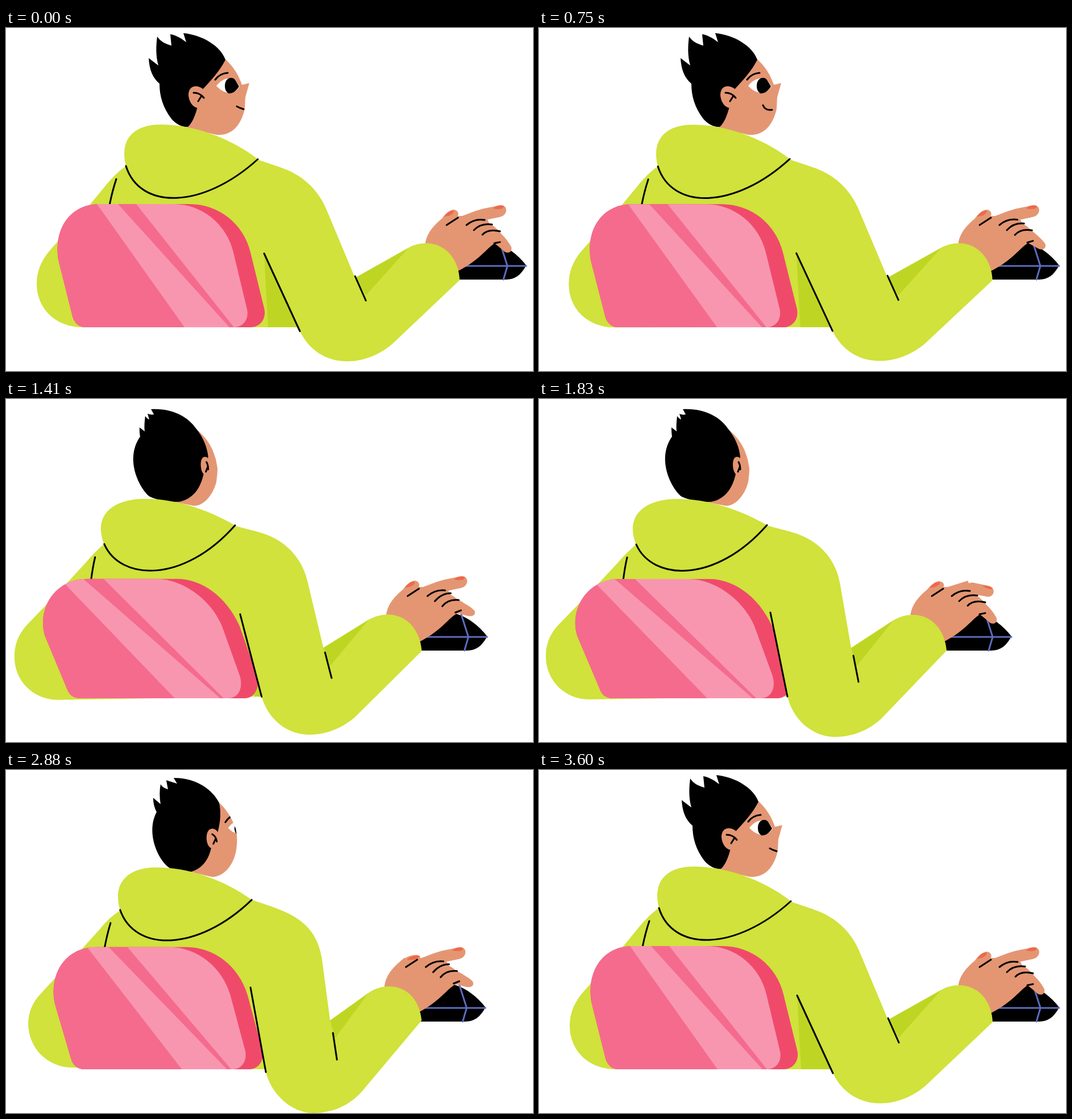
Recreate the animation shown at these times as an HTML page with a canvas. Size 927 px wide and 604 px high, loop 3.63 s.

```html
<!DOCTYPE html>
<html lang="en">
<head>
<meta charset="utf-8">
<style>
html, body { margin: 0; width: 100%; height: 100%; overflow: hidden; background: #fff; }
canvas { display: block; }
</style>
</head>
<body>
<canvas id="stage" width="927" height="604"></canvas>
<script>
const ctx = document.getElementById('stage').getContext('2d');
const LOOP = 3630;
const LIME = '#d0e23b', SHADE = '#bed623', SKIN = '#e49673', NAIL = '#ec6a4b', BLACK = '#000',
  PINK = '#f56b8d', LIGHT = '#f896b0', RED = '#f04a6b', BLUE = '#5c6cc0';

// Poses of one shape share the same path commands: sitting right, sitting left, reaching back.
const torso = [
  'M211 243C199 251 186 264 174 279L146 313L76 393C61 411 54 430 54 450C54 495 88 527 135 527L516 527L454 397L484 246L443 232L330 200Z',
  'M171 256C160 265 149 276 138 289L97 333L32 400C18 416 12 433 12 453C12 496 46 529 88 529L437 524L407 376L443 234L401 223L290 200Z',
  'M201 247C189 255 176 266 166 279L130 319L60 395C46 410 39 428 39 446C39 490 73 523 115 524L457 527L430 383L474 243L433 229L320 200Z'];
const sideShade = [
  'M454 397L461 527L516 527Z', 'M407 376L437 524L437 524Z', 'M430 383L457 527L457 527Z'];
const arm = [
  'M454 397L517 534C533 567 563 587 600 587C630 587 660 574 681 555L798 444C797 410 775 379 739 379C728 379 716 382 706 388L614 440L563 318C548 283 520 258 484 246L443 232Z',
  'M407 376L437 524C447 565 481 595 521 595C552 595 580 583 602 563L717 443C714 408 692 380 657 380C645 380 633 384 623 390L549 438L530 328C523 283 494 248 443 234L401 223Z',
  'M430 383L457 532C467 572 503 604 540 604C575 604 605 590 626 566L731 441C728 408 708 381 673 381C659 381 646 386 637 393L570 441L556 335C549 288 526 262 474 243L433 229Z'];
const armSeam = ['M454 397L517 534', 'M407 376L437 524', 'M430 383L457 532'];
const elbowShade = [
  'M614 440L707 388L633 471Z', 'M549 439L623 390L559 470Z', 'M570 441L637 393L579 472Z'];
const elbowCrease = ['M614 437L633 480', 'M553 452L562 498', 'M575 463L582 510'];
const hood = [
  'M443 231C390 190 325 170 272 170C228 170 208 192 208 221C208 229 209 236 211 243C235 320 345 320 443 231Z',
  'M401 222C350 193 295 176 244 176C190 176 165 200 165 228C165 238 167 248 171 256C199 320 310 326 401 222Z'];
const hoodLine = ['M211 243C235 320 345 320 443 231', 'M171 256C199 320 310 326 401 222'];
const backLine = ['M194 266Q187 287 182 312', 'M155 279Q151 296 148 320'];

const chairLeft = [
  'L140 527C128 527 120 519 117 508L93 412C82 358 110 310 165 310Z',
  'L130 527C117 527 110 520 107 511L68 419C52 370 85 317 142 317Z'];
const chairEdge = [
  'L295 310C345 310 388 345 400 395L424 495C428 513 417 527 401 527',
  'L265 317C305 317 358 350 379 400L410 485C418 508 409 527 390 527'];
const chairBack = [
  'M165 310L322 310C375 310 418 345 430 395L454 493C459 512 447 527 430 527' + chairLeft[0],
  'M142 317L300 317C340 317 385 345 410 400L440 485C447 508 437 527 420 527' + chairLeft[1]];
const chairFront = ['M165 310' + chairEdge[0] + chairLeft[0], 'M142 317' + chairEdge[1] + chairLeft[1]];
const shineWide = ['M229 310' + chairEdge[0] + 'L401 527Z', 'M169 317' + chairEdge[1] + 'L382 527Z'];
const shineThin = ['M160 310L197 310L393 527L314 527Z', 'M92 317L133 317L376 527L296 527Z'];

// Head poses: profile, three-quarter back, back.
const face = [
  'M386 55C400 68 409 82 415 100L428 97L421 122C420 135 421 142 418 150C410 175 395 190 370 188L318 176L330 100Z',
  'M382 54C396 66 404 78 410 91L415 103L417 115C418 125 417 137 415 146C409 172 390 190 372 188L330 178L340 100Z',
  'M376 53C391 66 401 80 406 94L410 106L413 122C413 131 412 138 411 146C405 170 388 189 371 188L330 180L350 100Z'];
const hair = [
  'M320 174C311 175 301 171 291 160C276 140 270 120 270 98C258 88 252 73 251 53L268 66C263 48 264 30 266 15C271 23 280 28 291 31L289 11C297 12 307 17 317 25L312 9C345 12 378 32 386 56C376 76 360 93 345 109L337 138C333 155 327 168 320 174Z',
  'M337 179C318 180 305 178 298 172C280 160 256 112 276 74C272 66 270 58 270 49L283 60C281 48 281 36 283 25C286 30 290 32 296 34L293 18C299 20 306 22 312 24L306 14C345 13 375 35 386 58C390 75 388 92 384 108L372 138C367 160 355 174 337 179Z',
  'M346 181C325 182 308 178 294 172C278 160 248 108 277 66C276 60 276 55 276 50L285 57C284 48 285 39 286 30C288 33 290 35 293 36L290 26C294 28 298 28 301 27L296 18C335 16 362 32 376 53C388 68 395 84 397 102L389 132C383 160 368 177 346 181Z'];
const ear = [
  'M350 112C342 99 321 98 321 118C322 131 329 140 338 141L352 128Z',
  'M385 113C382 100 364 98 364 119C364 128 367 136 373 138L384 126Z',
  'M399 108C394 98 384 100 384 115C384 123 386 130 390 133L398 122Z'];
const earLines = [
  'M330 114Q341 114 348 123M343 121L338 129',
  'M374 113Q381 117 382 126M380 121L376 130',
  'M394 111Q397 116 397 124M396 120L393 128'];
const eye = [
  'M370 102C378 90 395 84 404 93L411 103C402 118 385 118 370 102Z',
  'M402 102C405 98 408 95 412 92L420 100C420 114 412 113 402 102Z',
  'M422 102C425 98 428 95 432 92L440 100C440 114 432 113 422 102Z'];
const pupil = [
  'M385 102C385 86 400 84 404 93L410 103C404 113 396 116 391 115C387 112 385 108 385 102Z',
  'M413 102C414 96 416 94 419 92L425 103C425 110 421 113 417 113C414 110 413 106 413 102Z',
  'M433 102C434 96 436 94 439 92L445 103C445 110 441 113 437 113C434 110 433 106 433 102Z'];
const brow = ['M368 91Q376 80 390 79', 'M397 92Q400 87 405 83', 'M420 92Q423 87 428 83'];
const mouth = ['M406 138Q411 141 418 143', 'M420 140Q424 142 430 144', 'M436 140Q440 142 446 144'];
const smile = 'M396 136Q400 146 412 144';

// Hand: resting and moved finger poses.
const palm = 'M737 384C739 358 757 344 772 331L803 331L838 320L850 344L858 349L868 358L880 378L861 378C845 388 835 407 797 427L760 440Z';
const indexFinger = [
  'M793 335C815 326 828 321 840 318L870 312C883 311 884 330 868 333L830 341Z',
  'M793 335C812 331 830 327 846 323L875 329C889 333 885 350 872 348L838 342Z'];
const indexNail = [
  'M857 318C862 312 868 312 875 313C877 319 868 320 857 318Z',
  'M864 329C870 328 877 329 882 333C882 337 870 334 864 329Z'];
const thumb = [
  'M767 335C778 322 786 317 793 322C800 328 792 337 780 346Z',
  'M764 338C775 329 786 325 795 326C806 328 798 337 784 346Z'];
const thumbNail = [
  'M770 332C776 324 783 320 788 322C788 328 779 332 770 332Z',
  'M777 334C783 328 790 326 799 327C798 333 788 335 777 334Z'];
const littleFinger = [
  'M862 354C876 366 884 376 889 386C891 396 880 399 874 391L858 378Z',
  'M862 352C873 359 886 365 893 373C896 382 887 384 877 381L858 376Z'];
const knuckles = [
  'M775 347L795 334M810 347Q824 335 842 338M823 356Q835 343 855 346M838 364Q848 353 869 358M859 379L869 377',
  'M775 347L795 334M810 347Q824 335 841 337M823 356Q835 342 851 342M836 365Q846 352 865 354M859 376L869 372'];
const device = 'M790 443L797 420L860 378C885 385 905 405 915 418C906 435 895 443 880 443Z';
const deviceLines = 'M800 419L915 419M869 378L882 419L875 443';

const NUMBER = /[\d.]+/g;

function mix(poses, weights) {
  const values = poses.map(pose => pose.match(NUMBER));
  let i = 0;
  return poses[0].replace(NUMBER, () => {
    const sum = weights.reduce((total, w, k) => total + w * values[k][i], 0);
    i++;
    return sum.toFixed(2);
  });
}
const lerp = (poses, k) => mix(poses.slice(0, 2), [1 - k, k]);

function fill(path, color) {
  ctx.fillStyle = color;
  ctx.fill(new Path2D(path));
}

function line(path, color = BLACK) {
  ctx.strokeStyle = color;
  ctx.stroke(new Path2D(path));
}

function group(x, clip, paint) {
  ctx.save();
  ctx.translate(x, 0);
  if (clip) ctx.clip(new Path2D(clip));
  paint();
  ctx.restore();
}

function draw(t) {
  const ramp = (from, to) => {
    const u = Math.min(1, Math.max(0, (t - from) / (to - from)));
    return u * u * (3 - 2 * u);
  };
  const lean = ramp(635, 1525) - ramp(2440, 3100);
  const slide = ramp(735, 1665) - ramp(2710, 3417);
  const turn = ramp(750, 1450) - ramp(2560, 3200);
  const nod = ramp(1900, 2300) - ramp(2500, 2800);
  const grin = t < 1600 ? ramp(250, 500) : 0;
  const press = ramp(90, 250) - ramp(290, 450) + ramp(1670, 1820) - ramp(1850, 2010);
  const thumbDown = ramp(1750, 2100) - ramp(3050, 3400);
  const stretch = ramp(660, 860) - ramp(1400, 1670) + ramp(2480, 2700) - ramp(3200, 3430);

  // The reach weight comes from the hand lagging behind the body.
  const reach = (slide - lean) / 0.594;
  const left = lean - 0.26 * reach;
  const rig = poses => mix(poses, [1 - left - reach, left, reach]);
  const body = poses => lerp(poses, lean);
  const head = poses => turn < 0.5
    ? lerp(poses, turn * 2)
    : lerp(poses.slice(1), turn * 2 - 1);

  ctx.clearRect(0, 0, 927, 604);
  ctx.lineWidth = 3;
  ctx.lineCap = 'round';

  group(-43 * lean, null, () => {
    // Tilt around the neck.
    ctx.translate(333, 180);
    ctx.rotate(-0.022 * nod);
    ctx.translate(-333, -180);
    const facePath = head(face);
    fill(facePath, SKIN);
    group(0, facePath, () => {
      fill(head(eye), '#fff');
      fill(head(pupil), BLACK);
      line(head(brow));
      line(head([lerp([mouth[0], smile], grin), mouth[1], mouth[2]]));
    });
    fill(head(hair), BLACK);
    fill(head(ear), SKIN);
    line(head(earLines));
  });

  fill(rig(torso), LIME);
  fill(rig(sideShade), SHADE);
  line(body(backLine));

  const front = body(chairFront);
  fill(body(chairBack), RED);
  fill(front, PINK);
  group(0, front, () => {
    fill(body(shineThin), LIGHT);
    fill(body(shineWide), LIGHT);
  });

  group(-84 * slide, null, () => {
    fill(device, BLACK);
    line(deviceLines, BLUE);
    fill(lerp(littleFinger, stretch), SKIN);
    fill(palm, SKIN);
    fill(lerp(indexFinger, press), SKIN);
    fill(lerp(thumb, thumbDown), SKIN);
    fill(lerp(indexNail, press), NAIL);
    fill(lerp(thumbNail, thumbDown), NAIL);
    line(lerp(knuckles, stretch));
  });

  fill(rig(arm), LIME);
  fill(rig(elbowShade), SHADE);
  line(rig(armSeam));
  line(rig(elbowCrease));
  fill(body(hood), LIME);
  line(body(hoodLine));
}

const start = performance.now();
function tick() {
  draw((performance.now() - start) % LOOP);
  requestAnimationFrame(tick);
}
tick();
</script>
</body>
</html>
```
